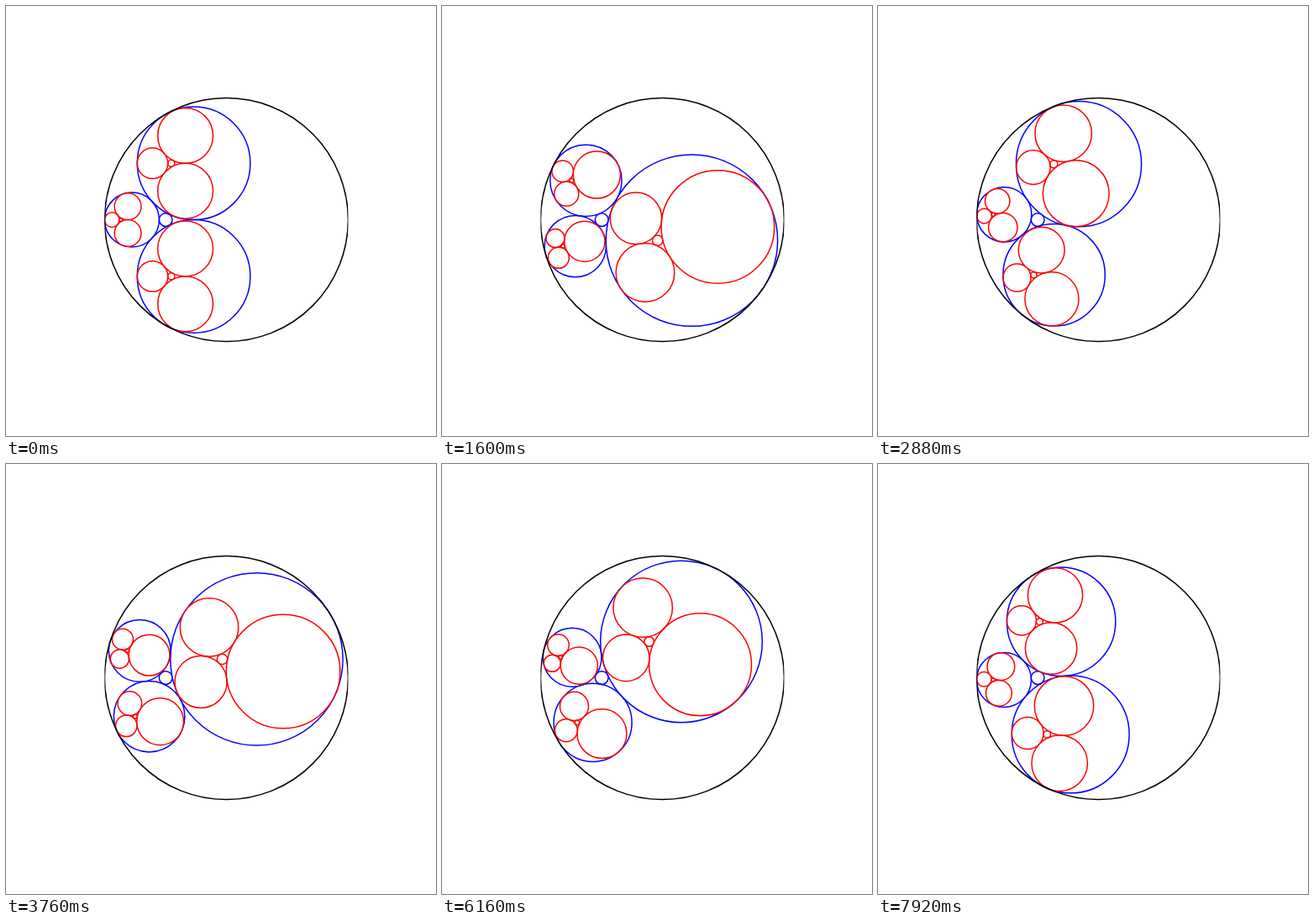
Write an HTML page with a canvas that moves like this. It is 512 by 512 pixels and loops after 8 s.

```html
<!DOCTYPE html>
<html>
<head>
<meta charset="utf-8">
<title>Nested Steiner chains</title>
<style>
  html, body { margin: 0; height: 100%; overflow: hidden; background: #fff; }
  canvas { display: block; }
</style>
</head>
<body>
<canvas width="512" height="512"></canvas>
<script>
const ctx = document.querySelector("canvas").getContext("2d");
const LOOP = 8000, STEPS = 100;
const OUTER = { x: 262.4, y: 254.6, r: 145 };
const SIN = Math.sin(Math.PI / 3);
const INNER = (1 - SIN) / (1 + SIN); // inner radius of a concentric chain of three

// Image of a circle under z -> (z - a) / (1 - a z), which keeps the unit disc.
function shift({ x, y, r }, a) {
  const wx = 1 - a * x, wy = a * y;
  const k = (1 / a - a) / (wx * wx + wy * wy - a * a * r * r);
  return { x: k * wx - 1 / a, y: k * wy, r: k * a * r };
}

// Three touching circles and the inner one, fitted into the parent circle.
function chain(parent, a, angle) {
  const circles = [0, 1, 2].map(i => {
    const phi = Math.PI + angle + i * 2 * Math.PI / 3;
    const d = (1 + INNER) / 2;
    return { x: d * Math.cos(phi), y: d * Math.sin(phi), r: (1 - INNER) / 2 };
  });
  circles.push({ x: 0, y: 0, r: INNER });
  return circles.map(c => shift(c, a)).map(c => ({
    x: parent.x + c.x * parent.r,
    y: parent.y + c.y * parent.r,
    r: c.r * parent.r
  }));
}

function stroke(circles, color) {
  ctx.strokeStyle = color;
  for (const { x, y, r } of circles) {
    ctx.beginPath();
    ctx.arc(x, y, r, 0, 2 * Math.PI);
    ctx.stroke();
  }
}

function draw(time) {
  const step = Math.floor((time % LOOP) / LOOP * STEPS);
  const angle = step / STEPS * 2 * Math.PI;
  const blue = chain(OUTER, 0.5, angle);
  const red = blue.slice(0, 3).flatMap(c => chain(c, 0.4, -angle));

  ctx.fillStyle = "#fff";
  ctx.fillRect(0, 0, 512, 512);
  ctx.save();
  ctx.beginPath();
  ctx.rect(OUTER.x - OUTER.r, 0, 2 * OUTER.r, 512);
  ctx.clip();
  ctx.lineWidth = 1.5;
  stroke(blue, "#00f");
  stroke(red, "#f00");
  stroke([OUTER], "#000");
  ctx.restore();
}

function tick() {
  draw(performance.now());
  requestAnimationFrame(tick);
}
tick();
</script>
</body>
</html>
```
